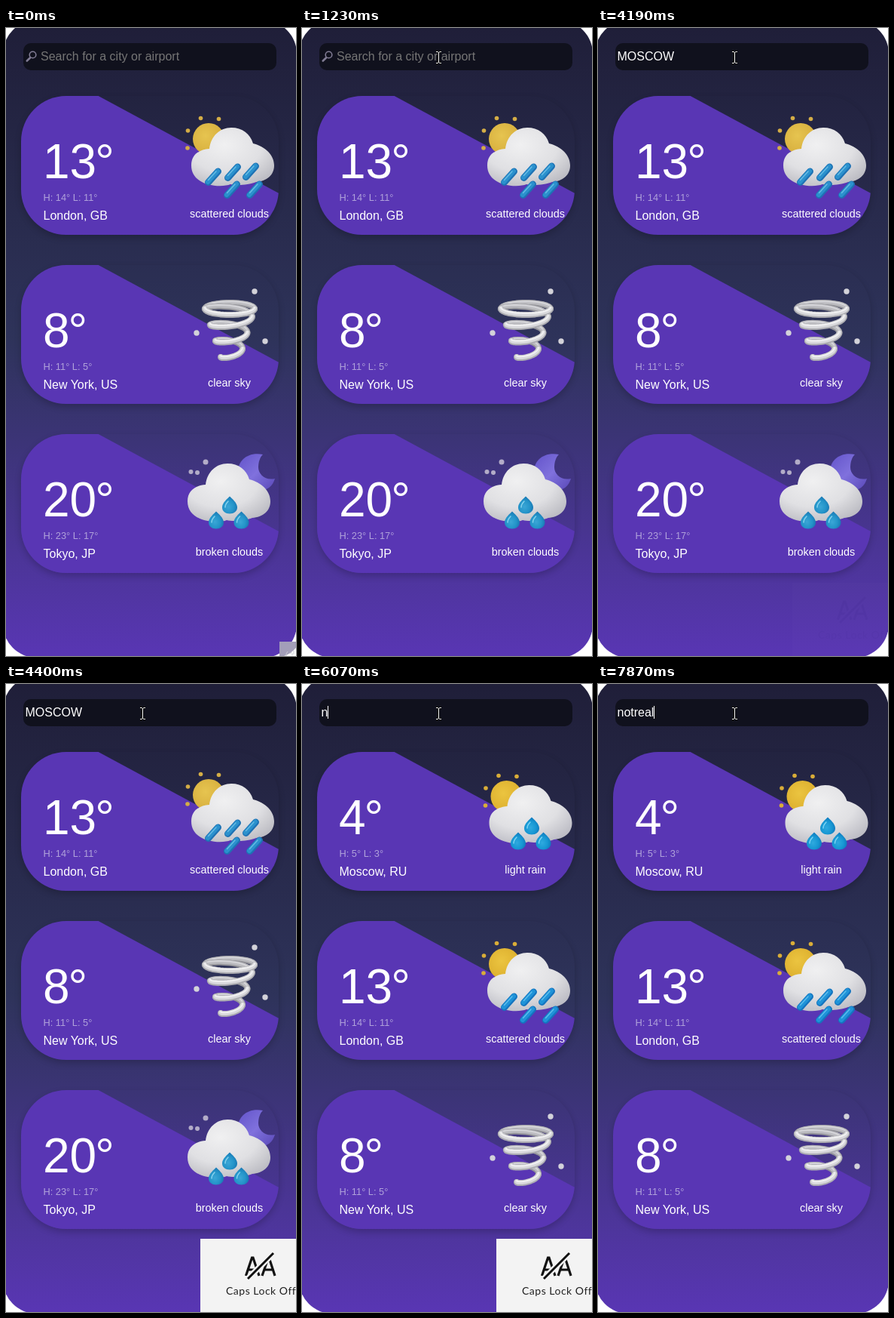
An HTML page that plays this animation: 385x832 px, repeating every 8000 ms.

```html
<!DOCTYPE html>
<html lang="en">
<head>
<meta charset="utf-8">
<title>Weather search</title>
<style>
html, body { margin: 0; width: 100%; height: 100%; overflow: hidden; background: #fff; }
.stage { position: fixed; inset: 0; overflow: clip; contain: strict; }
.sheet {
  position: absolute; left: -4px; top: -10px; width: 390px; height: 844px; border-radius: 44px;
  background: linear-gradient(#1f1e38, #2e335a 50%, #5936b4);
}
.shade {
  position: absolute; left: 20px; width: 342px; height: 184px; border-radius: 60px;
  box-shadow: 0 4px 10px rgba(0, 0, 0, .2);
}
svg { position: absolute; left: 0; top: 0; font-family: "Liberation Sans", Arial, sans-serif; }
text { white-space: pre; }
.temp { font-size: 64px; fill: #fff; }
.range { font-size: 12.8px; fill: rgba(235, 235, 245, .6); }
.city { font-size: 16px; fill: #fff; }
.sky { font-size: 14.4px; fill: #fff; text-anchor: middle; }
.field { font-size: 16px; }

#before { animation: before 8s step-end infinite; }
#after { animation: after 8s step-end infinite; }
#before .icon { filter: saturate(.88); }
.corner { animation: corner 8s step-end infinite; }
.toast { animation: toast 8s step-end infinite; }
.arrow { animation: arrow 8s linear infinite; }
.beam { animation: beam 8s linear infinite; }

@keyframes before { 0% { visibility: visible } 55.875%, 100% { visibility: hidden } }
@keyframes after { 0% { visibility: hidden } 55.875%, 100% { visibility: visible } }
@keyframes corner { 0% { opacity: 1 } .875%, 100% { opacity: 0 } }
@keyframes toast {
  0% { opacity: 0 }
  52.375% { opacity: .012 }
  53.25% { opacity: .35 }
  54.125% { opacity: .75 }
  55% { opacity: 1 }
  77.5%, 100% { opacity: 0 }
}
@keyframes arrow {
  0%, .874% { opacity: 0; transform: translate(374px, 812px) }
  .875% { opacity: 1; transform: translate(374px, 812px) }
  2.5% { transform: translate(246px, 104px) }
  3.375%, 7.5% { transform: translate(233px, 119px) }
  13.624% { opacity: 1; transform: translate(190px, 57px) }
  13.625%, 100% { opacity: 0; transform: translate(190px, 57px) }
}
@keyframes beam {
  0%, 13.624% { opacity: 0; transform: translate(190px, 55px) }
  13.625% { opacity: 1; transform: translate(190px, 55px) }
  15.375%, 100% { opacity: 1; transform: translate(181px, 39px) }
}
</style>
</head>
<body>
<div class="stage">
<div class="sheet"></div>
<div class="shade" style="top:90px"></div>
<div class="shade" style="top:314px"></div>
<div class="shade" style="top:538px"></div>

<svg width="385" height="832" viewBox="0 0 385 832">
  <defs>
    <radialGradient id="cloudFill" cx=".4" cy=".3" r=".75">
      <stop offset="0" stop-color="#f0f0f1"/>
      <stop offset=".6" stop-color="#e0e0e3"/>
      <stop offset="1" stop-color="#bdbdc5"/>
    </radialGradient>
    <radialGradient id="sunFill" cx=".4" cy=".4" r=".65">
      <stop offset="0" stop-color="#ebc440"/>
      <stop offset="1" stop-color="#dbad2c"/>
    </radialGradient>
    <linearGradient id="moonFill" x1="0" y1="0" x2="1" y2="1">
      <stop offset="0" stop-color="#6350d8"/>
      <stop offset=".5" stop-color="#8070ea"/>
      <stop offset="1" stop-color="#5a45c4"/>
    </linearGradient>
    <radialGradient id="dropFill" cx=".42" cy=".6" r=".6">
      <stop offset="0" stop-color="#2fa9df"/>
      <stop offset=".6" stop-color="#1797d3"/>
      <stop offset="1" stop-color="#0f78bd"/>
    </radialGradient>

    <path id="cloud" fill="url(#cloudFill)" d="M246 182C246 168 256 161 270 160C272 143 284 132 299 132C314 132 324 140 328 153C344 157 356 168 356 182C356 195 346 203 332 204C322 208 306 209 298 207C286 212 246 210 246 182Z"/>
    <g id="sun">
      <circle cx="269" cy="147" r="21" fill="url(#sunFill)"/>
      <g fill="#d9ad38">
        <circle cx="241.500" cy="136" r="2.800"/><circle cx="258.500" cy="119.500" r="2.800"/>
        <circle cx="282.500" cy="120.500" r="2.800"/><circle cx="241" cy="159" r="2.800"/>
      </g>
    </g>
    <g id="drop">
      <path fill="url(#dropFill)" d="M0-11.500C3-8.500 10-3 10 3C10 8.500 5.500 11.500 0 11.500C-5.500 11.500-10 8.500-10 3C-10-3-3-8.500 0-11.500Z"/>
      <path fill="none" stroke="#7bd3f3" stroke-width="1.500" stroke-linecap="round" d="M-6 3C-6-.500-3.500-3.500-2-5"/>
    </g>
    <g id="drops">
      <use href="#drop" x="305" y="188"/><use href="#drop" x="287" y="208"/><use href="#drop" x="320.500" y="208"/>
    </g>
    <g id="bar" stroke-linecap="round">
      <path d="M-6.500 7.500L6.500-7" stroke="#1474bf" stroke-width="9"/>
      <path d="M-7 7L6-7.500" stroke="#1f93d8" stroke-width="6"/>
      <path d="M-6.500 4.500L4-7" stroke="#5dbdec" stroke-width="1.500"/>
    </g>

    <g id="scattered">
      <use href="#sun"/><use href="#cloud"/>
      <use href="#bar" x="275" y="197"/><use href="#bar" x="301" y="191"/><use href="#bar" x="325" y="190"/>
      <use href="#bar" x="300" y="214"/><use href="#bar" x="330" y="214"/>
    </g>
    <g id="rain">
      <g transform="translate(2.500 2)"><use href="#sun"/><use href="#cloud"/></g>
      <use href="#drops"/>
    </g>
    <g id="broken">
      <path fill="url(#moonFill)" d="M341 117C320 113 307 126 308 142L330 165C346 166 354 160 357 149C344 152 335 143 335 134C335 127 337 121 341 117Z"/>
      <g fill="#b3accb">
        <circle cx="245.500" cy="140" r="3"/><circle cx="254" cy="141" r="3"/><circle cx="265" cy="127" r="3.500"/>
      </g>
      <use href="#cloud" x="-5" y="-3"/>
      <use href="#drops" x="-8" y="-4"/>
    </g>
    <g id="tornado"></g>
  </defs>

  <g id="before"></g>
  <g id="after"></g>

  <rect x="23" y="20" width="336" height="36" rx="10" fill="#10111d"/>
  <g class="field">
    <g id="hint">
      <g fill="none" stroke="#817c94" stroke-linecap="round">
        <circle cx="35.500" cy="35.500" r="4.300" stroke-width="1.600"/>
        <path d="M32 39.500L27.800 43.500" stroke-width="2.600"/>
      </g>
      <text x="46" y="43" fill="#757575">Search for a city or airport</text>
    </g>
    <rect id="mark" x="26" y="29" width="75" height="18" fill="#0a4cb0"/>
    <text id="typed" x="25.500" y="43" fill="#fff"></text>
    <rect id="caret" y="29" width="1" height="17" fill="#fff"/>
  </g>

  <g class="corner">
    <path d="M363 813H385V821C381 826 375 830 369 832H363Z" fill="#a39eb9"/>
    <path d="M374 826Q371 829 372 832M377 829Q380 825 380 831M382 825V830" fill="none" stroke="#c9c9d0"/>
  </g>

  <g class="toast">
    <rect x="258" y="735" width="127" height="97" fill="#f3f3f3"/>
    <g fill="none" stroke="#111" stroke-width="3.200">
      <path d="M318.500 784L326.500 760H328L336 784M321 776H334M340 784L348 761H349.500L357 784M343 776H355"/>
      <path d="M321 788L355 754" stroke="#f3f3f3" stroke-width="8"/>
      <path d="M321 788L355 754" stroke-width="3"/>
    </g>
    <text x="292" y="809" fill="#222" style="font:14px Lato,sans-serif;letter-spacing:.5px">Caps Lock Off</text>
  </g>

  <path class="arrow" d="M.5.5V16L4.200 12.500L6.600 18.300L9 17.300L6.600 11.700H11.500Z" fill="#fff" stroke="#000" stroke-width=".9"/>
  <g class="beam" fill="none">
    <path d="M-3-7.500H-1.500L.5-6.500L2.500-7.500H4M.5-6.500V6.500M-3 7.500H-1.500L.5 6.500L2.500 7.500H4" stroke="#000" stroke-width="2.400"/>
    <path d="M-3-7.500H-1L.5-6.500L2-7.500H4M.5-6.500V6.500M-3 7.500H-1L.5 6.500L2 7.500H4" stroke="#fff"/>
  </g>
</svg>
</div>

<script>
const $ = id => document.getElementById(id);
const LOOP = 8000, BLINK = 530;

const places = {
  moscow: [4, 5, 3, 'Moscow, RU', 'rain', 'light rain'],
  london: [13, 14, 11, 'London, GB', 'scattered', 'scattered clouds'],
  newYork: [8, 11, 5, 'New York, US', 'tornado', 'clear sky'],
  tokyo: [20, 23, 17, 'Tokyo, JP', 'broken', 'broken clouds']
};

function card(key, i) {
  const [temp, high, low, city, icon, sky] = places[key];
  return `<g transform="translate(0 ${i * 224})">
    <path fill="#5936b4" d="M122.600 90L361.800 218.800A60 60 0 0 1 302 274H80A60 60 0 0 1 20 214V150A60 60 0 0 1 80 90Z"/>
    <text class="temp" x="49" y="199">${temp}<tspan dx="-2">°</tspan></text>
    <text class="range" x="49.500" y="229">H: ${high}° L: ${low}°</text>
    <text class="city" x="49.500" y="254">${city}</text>
    <use class="icon" href="#${icon}"/>
    <text class="sky" x="296.500" y="251">${sky}</text></g>`;
}

// Helix: one flat ring on top, then three shrinking turns.
function coil(from, to) {
  let d = '';
  for (let k = 0; k <= 24; k++) {
    const turn = from + (to - from) * k / 24;
    const drop = Math.max(0, turn - 1);
    const a = Math.PI * (1 + 2 * turn);
    const x = 297 + drop * .3 + (33 - 6.7 * drop) * Math.cos(a);
    const y = 148 + 21.3 * drop + (8 - .9 * drop) * Math.sin(a);
    d += (k ? 'L' : 'M') + x.toFixed(1) + ' ' + y.toFixed(1);
  }
  return d;
}

function tube(d, tones) {
  const line = (color, width, dy) =>
    `<path d="${d}" stroke="${color}" stroke-width="${width}" transform="translate(0 ${dy})"/>`;
  return line(tones[0], 8, 0) + line(tones[1], 5.6, -.8) + line(tones[2], 1.8, -1.8);
}

function tornado() {
  let back = '', front = '';
  for (let n = 0; n < 4; n++) {
    back += tube(coil(n, n + .5), ['#94949a', '#bcbcc1', '#d6d6da']);
    front += tube(coil(n + .5, n + 1), ['#acacb2', '#d9d9dc', '#f2f2f3']);
  }
  const dots = [[330, 125], [253, 180], [344, 191]]
    .map(([x, y]) => `<circle cx="${x}" cy="${y}" r="3.700" fill="#d3d2da"/>`).join('');
  return `<g fill="none" stroke-linecap="round" stroke-linejoin="round">${back}${front}</g>${dots}`;
}

$('tornado').innerHTML = tornado();
$('before').innerHTML = ['london', 'newYork', 'tokyo'].map(card).join('');
$('after').innerHTML = ['moscow', 'london', 'newYork'].map(card).join('');

const FOCUS = 1560, SELECT = 5010, CLEAR = 5750;
const keys = [
  [0, ''], [FOCUS, ''], [2350, 'M'], [2550, 'MO'], [2610, 'MOS'], [3270, 'MOSC'],
  [3330, 'MOSCO'], [3400, 'MOSCOW'], [CLEAR, ''], [6070, 'n'], [6610, 'no'],
  [6740, 'not'], [6940, 'notr'], [7010, 'notre'], [7080, 'notrea'],
  [7220, 'notreak'], [7680, 'notrea'], [7870, 'notreal']
];
const show = (id, on) => $(id).setAttribute('visibility', on ? 'visible' : 'hidden');
const start = performance.now();

function draw() {
  const t = (performance.now() - start) % LOOP;
  const [since, text] = keys.filter(k => k[0] <= t).pop();
  const selected = t >= SELECT && t < CLEAR;
  const typed = $('typed');
  if (typed.textContent !== text) typed.textContent = text;
  $('caret').setAttribute('x', Math.round(25.5 + (text ? typed.getComputedTextLength() : 0)));
  show('hint', !text);
  show('mark', selected);
  show('caret', t >= FOCUS && !selected && (t - since) % (2 * BLINK) < BLINK);
  requestAnimationFrame(draw);
}
draw();
</script>
</body>
</html>
```
